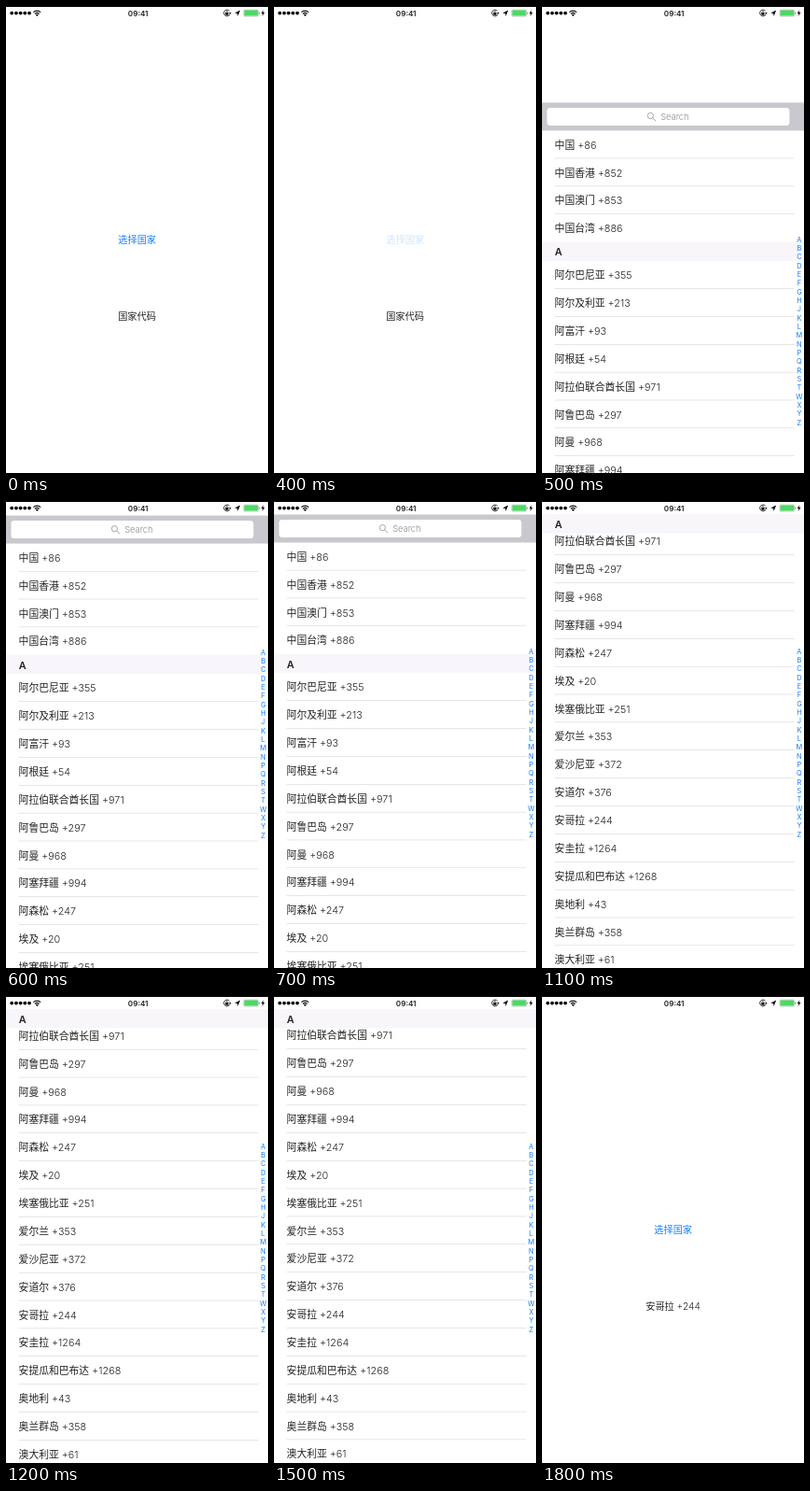
An HTML page for the animation above (2.4 s loop, 281 px wide and 500 px high).

```html
<!DOCTYPE html>
<html lang="zh-CN">
<head>
<meta charset="utf-8">
<style>
  html, body { margin: 0; width: 100%; height: 100%; overflow: hidden; background: #fff; }
  svg { display: block; width: 281px; height: 500px; }
  text { font: 350 10.8px Inter, "Noto Sans CJK SC", "Noto Sans CJK", sans-serif; fill: #222; }
  .mid { text-anchor: middle; }
  .home text { font-size: 10.18px; }
  .home .link, .index text { fill: #147efb; }
  .index text { font-size: 7.4px; font-weight: 400; }
  .head text { font-weight: 600; }
  .status text { font-size: 8.1px; font-weight: 600; }
  .hint { font-size: 9.3px; fill: #8e8e93; }
</style>
</head>
<body>
<svg viewBox="0 0 281 500">
  <defs>
    <clipPath id="view"><rect y="14" width="281" height="486"/></clipPath>
  </defs>

  <g class="home">
    <text id="pick" class="mid link" x="140.7" y="254.3">选择国家</text>
    <text id="label" class="mid" x="140.5" y="336.3"></text>
  </g>

  <g id="sheet">
    <rect y="14" width="281" height="500" fill="#fff"/>
    <g clip-path="url(#view)">
      <g id="list">
        <rect y="14.5" width="281" height="30" fill="#c9c8ce"/>
        <rect x="5.4" y="20" width="260" height="19" rx="3.4" fill="#fff"/>
        <g fill="none" stroke="#8e8e93" stroke-width=".8">
          <circle cx="116.4" cy="28.6" r="3.1"/>
          <path d="M118.7 30.9l3.4 3.4"/>
        </g>
        <text class="hint" x="127.2" y="33">Search</text>
      </g>
      <g id="head" class="head">
        <rect y="-.5" width="281" height="20.5" fill="#f8f6fa"/>
        <text x="13.8" y="14.5">A</text>
      </g>
    </g>
    <g id="index" class="index"></g>
  </g>

  <g class="status">
    <rect width="281" height="14" fill="#fff"/>
    <rect width="281" height="1"/>
    <g id="dots"></g>
    <g fill="none" stroke="#000" stroke-width="1.1">
      <path d="M29.4 6.7a5.7 5.7 0 0 1 7.8 0M30.9 8.4a3.6 3.6 0 0 1 4.8 0"/>
    </g>
    <path d="M33.3 11l-1.5-1.6a2.2 2.2 0 0 1 3 0z"/>
    <text class="mid" x="141.7" y="10.7">09:41</text>
    <path d="M239.6 5.2a3.4 3.4 0 1 0 .6 3.6" fill="none" stroke="#000" stroke-width=".8"/>
    <path d="M239 7h2.6l-1.3 1.8z"/>
    <rect x="235.3" y="7.2" width="3.2" height="2.5"/>
    <path d="M235.9 7.2v-.7a1 1 0 0 1 2 0v.7" fill="none" stroke="#000" stroke-width=".6"/>
    <path d="M251.2 4.6l-2.6 6.3-.5-2.9-2.9-.5z"/>
    <rect x="255" y="4.1" width="15.6" height="7" rx="1" fill="#fff" stroke="#aaa" stroke-width=".6"/>
    <rect x="255.5" y="4.6" width="14.6" height="6" rx=".4" fill="#4cd964"/>
    <rect x="271.1" y="6.4" width="1" height="2.4" rx=".5" fill="#888"/>
    <path d="M276.4 4.2l-2.7 3.9h1.7l-.7 3 2.8-4.1h-1.7z"/>
  </g>
</svg>
<script>
const $ = id => document.getElementById(id);
const ROW = 29.87, TOP = 14.5, HEAD_Y = 164;
const first = ['中国 +86', '中国香港 +852', '中国澳门 +853', '中国台湾 +886'];
const groupA = ['阿尔巴尼亚 +355', '阿尔及利亚 +213', '阿富汗 +93', '阿根廷 +54',
  '阿拉伯联合酋长国 +971', '阿鲁巴岛 +297', '阿曼 +968', '阿塞拜疆 +994',
  '阿森松 +247', '埃及 +20', '埃塞俄比亚 +251', '爱尔兰 +353', '爱沙尼亚 +372',
  '安道尔 +376', '安哥拉 +244', '安圭拉 +1264', '安提瓜和巴布达 +1268',
  '奥地利 +43', '奥兰群岛 +358', '澳大利亚 +61'];

function add(parent, tag, attrs, text = '') {
  const el = document.createElementNS('http://www.w3.org/2000/svg', tag);
  for (const key in attrs) el.setAttribute(key, attrs[key]);
  el.textContent = text;
  parent.append(el);
}

function addRows(names, top) {
  names.forEach((name, i) => {
    const y = top + i * ROW;
    add($('list'), 'text', { x: 13.6, y: y + 19.3 }, name);
    if (i < names.length - 1)
      add($('list'), 'rect', { x: 13.6, y: y + ROW - .5, width: 257, height: .45, fill: '#c8c7cc' });
  });
}

addRows(first, 44.5);
addRows(groupA, HEAD_Y + 20);
[...'ABCDEFGHJKLMNPQRSTWXYZ'].forEach((c, i) =>
  add($('index'), 'text', { class: 'mid', x: 275.9, y: 163.7 + i * 9.33 }, c));
for (let i = 0; i < 5; i++) add($('dots'), 'circle', { cx: 6.2 + i * 4.7, cy: 7.6, r: 1.9 });

// Critically damped spring: 1 at the start, falling to 0.
function spring(ms) {
  const x = Math.max(0, ms) * .0525;
  return (1 + x) * Math.exp(-x);
}

function scrollAt(t) {
  if (t < 1000) return 0;
  if (t < 1100) return 3.4;
  return 276.4 - Math.exp((1100 - t) / 150);
}

const move = (id, y) => $(id).setAttribute('transform', `translate(0 ${y})`);

function frame(now) {
  const t = Math.floor(now % 2400 / 100) * 100; // the picture steps ten times a second
  const scroll = scrollAt(t);
  const open = t >= 500 && t < 1800;
  $('sheet').style.display = open ? '' : 'none';
  move('sheet', 500 * (t < 1600 ? spring(t - 440) : 1 - spring(t - 1658.5)));
  move('list', -scroll);
  move('head', Math.max(TOP, HEAD_Y - scroll));
  $('pick').style.opacity = t === 400 ? .2 : 1;
  $('label').textContent = t < 1700 ? '国家代码' : '安哥拉 +244';
}

const start = performance.now();
function loop() {
  frame(performance.now() - start);
  requestAnimationFrame(loop);
}
loop();
</script>
</body>
</html>
```
